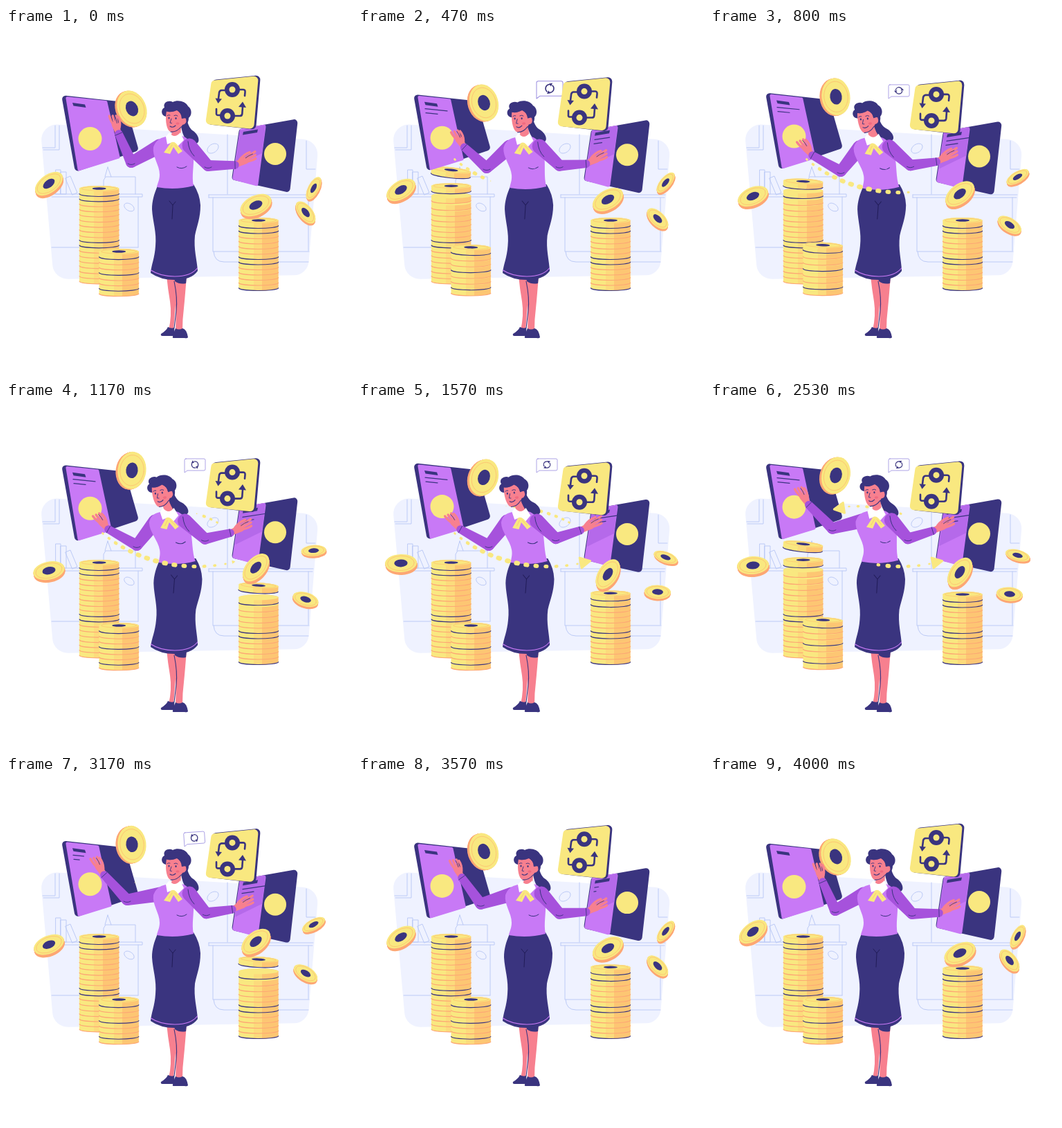
These frames come from a looping animation (500 by 500 pixels, 4.03 s). An HTML page with a canvas:

```html
<!DOCTYPE html>
<html lang="en">
<head>
<meta charset="utf-8">
<title>Coin exchange</title>
<style>
html, body { margin: 0; width: 100%; height: 100%; overflow: hidden; background: #fff; }
canvas { display: block; width: 500px; height: 500px; }
</style>
</head>
<body>
<canvas id="stage" width="500" height="500"></canvas>
<script>
const ctx = document.getElementById('stage').getContext('2d');
const NAVY = '#3a347f', LILAC = '#c879f6', PURPLE = '#a652dc', SKIN = '#f7808f',
  YELLOW = '#f9e880', AMBER = '#fdc673', ORANGE = '#fda774', PALE = '#eff2ff', LINE = '#bccaf6';
const TAU = Math.PI * 2, RAD = Math.PI / 180;

const clamp = v => Math.max(0, Math.min(1, v));
const ramp = (t, a, b) => clamp((t - a) / (b - a));
const mix = (a, b, u) => a + (b - a) * u;
const glide = (t, a, b) => { const u = ramp(t, a, b); return u * u * (3 - 2 * u); };
// rises during a..b, falls during c..d
const span = (t, a, b, c, d) => glide(t, a, b) - glide(t, c, d);
const pulse = (t, at, width) => Math.exp(-(((t - at) / width) ** 2));

function fill(d, color) { ctx.fillStyle = color; ctx.fill(new Path2D(d)); }
function stroke(d, color, w = 1) {
  ctx.strokeStyle = color;
  ctx.lineWidth = w;
  ctx.lineCap = ctx.lineJoin = 'round';
  ctx.stroke(new Path2D(d));
}
function oval(x, y, rx, ry, color, a = 0) {
  ctx.fillStyle = color;
  ctx.beginPath();
  ctx.ellipse(x, y, rx, ry, a, 0, TAU);
  ctx.fill();
}
function ring(x, y, rx, ry, color, w = 1, a = 0, from = 0, to = TAU) {
  ctx.strokeStyle = color;
  ctx.lineWidth = w;
  ctx.beginPath();
  ctx.ellipse(x, y, rx, ry, a, from, to);
  ctx.stroke();
}
function group(draw, x = 0, y = 0, a = 0, k = 1) {
  ctx.save();
  ctx.translate(x, y);
  ctx.rotate(a);
  ctx.scale(k, k);
  draw();
  ctx.restore();
}
// polygon with rounded corners
function slab(pts, r, color) {
  const n = pts.length, [a, b] = [pts[n - 1], pts[0]];
  ctx.beginPath();
  ctx.moveTo((a[0] + b[0]) / 2, (a[1] + b[1]) / 2);
  pts.forEach((p, i) => ctx.arcTo(...p, ...pts[(i + 1) % n], r));
  ctx.closePath();
  ctx.fillStyle = color;
  ctx.fill();
}
// tapered limb between two round joints
function limb(p, q, r1, r2, color) {
  const a = Math.atan2(q[1] - p[1], q[0] - p[0]);
  ctx.fillStyle = color;
  ctx.beginPath();
  ctx.arc(...p, r1, a + Math.PI / 2, a - Math.PI / 2);
  ctx.arc(...q, r2, a - Math.PI / 2, a + Math.PI / 2);
  ctx.fill();
}

function room() {
  slab([[49, 138], [452, 162], [436, 357], [69, 363]], 22, PALE);
  stroke('M71 141V173H53M77 141V176H54M66 240H197V244H66M191 244V317M66 317H191M108 244V317', LINE);
  stroke('M72 205h7v35h-7zM79 208h8v32h-8zM86 217l7 -3 10 24 -7 3z', LINE);
  stroke('M141 240V220l3 -5h43v25M147 201l-4 14M147 201l5 14', LINE);
  ring(178, 259, 8, 5, LINE, 1, .55);
  ring(299, 174, 9, 6, LINE, 1, -.6);
  stroke('M293 241H444M293 245H443M293 241v4M299 245V323M437 245V322M300 323H438M300 323Q301 338 315 338H437', LINE);
  stroke('M320 154V240M434 163V204H447', LINE);
}

function stackCoin(x, y, h, dark, top, tilt) {
  const r = 28.7;
  group(() => {
    ctx.fillStyle = shade(r);
    ctx.beginPath();
    ctx.moveTo(-r, 0);
    ctx.ellipse(0, h, r, 4, 0, Math.PI, 0, true);
    ctx.lineTo(r, 0);
    ctx.ellipse(0, 0, r, 4, 0, 0, Math.PI, true);
    ctx.fill();
    ring(0, h, r, 4, dark ? NAVY : ORANGE, 1.1, 0, .05, Math.PI - .05);
    oval(0, 0, r, 4, YELLOW);
    if (top) {
      ring(0, 0, r - 3, 3, AMBER, .8);
      oval(0, 0, 10, 1.7, NAVY);
    }
  }, x, y, tilt);
}
// three flat bands across a coin's side
function shade(r) {
  const g = ctx.createLinearGradient(-r, 0, r, 0);
  [YELLOW, '#fcdb7c', AMBER].forEach((color, i) => {
    g.addColorStop(i && .15 + i * .22, color);
    g.addColorStop(i < 2 ? .37 + i * .22 : 1, color);
  });
  return g;
}
// every `cycle` coins the first `run` have a dark rim; lift is how high each is thrown
function stack(x, top, n, h, cycle, run, lift) {
  for (let i = n - 1; i >= 0; i--) {
    const up = lift(i);
    stackCoin(x, top + i * h - up, h, i % cycle < run, !i || up > 8, i ? 0 : up * .004);
  }
}
function stacks(t) {
  const p = t % 2000 / 2000;
  const bump = from => Math.sin(Math.PI * ramp(p, from, from + .4));
  stack(134.7, 232, 18, 7.44, 9, 2, i => 27 * bump(.05) * .42 ** i);
  stack(163.2, 323, 8, 7.6, 3, 1, i => 10 * bump(.15) * (1 - i / 8));
  stack(365, 278, 13, 7.5, 6, 2, i => 13 * bump(.4) * .25 ** i);
}

function coin(x, y, rx, ry, deg, ex, ey) {
  const a = deg * RAD;
  for (let i = 5; i > 0; i--) oval(x + ex * i / 5, y + ey * i / 5, rx, ry, ORANGE, a);
  oval(x, y, rx, ry, YELLOW, a);
  ring(x, y, rx * .84, ry * .82, AMBER, 1, a);
  oval(x, y, rx * .42, ry * .42, NAVY, a);
}

// two lines of writing that grow to the share w
function note(x, y, slope, w) {
  if (w < .02) return;
  for (const [i, len] of [32, 17].entries())
    stroke(`M${x + i * Math.sign(slope)} ${y + i * 6}l${len * w} ${len * slope * w}`, NAVY, 1.2);
}
function leftCard(t, c) {
  const f = 12 * (1 - span(t, 0, 400, 3350, 4000));
  group(() => {
    slab([[80, 97], [172, 107], [192, 177], [100, 208]], 5, NAVY);
    slab([[86, 99], [134 + f, 104 + f * .1], [153 + f, 192 - f * .33], [104, 207]], 2, LILAC);
    fill('M96 108l18 2.5 1.5 4.5 -18 -2.5z', NAVY);
    note(97, 118, .1, span(t, 60, 380, 2900, 3420));
    oval(121.5, 160, 17, 17, YELLOW);
  }, 0, 5 * (c - 1));
}
function rightCard(t, c) {
  group(() => {
    slab([[337, 146], [422, 131], [410, 238], [326, 219]], 5, NAVY);
    slab([[338, 146], [376, 139], [364, 229], [327, 219]], 3, LILAC);
    fill('M338 148L375 140 370 181 331 200z', '#b569ea');
    fill('M343 150l21 -3.5 -1 4.5 -21 3.5z', NAVY);
    note(342, 160, -.15, span(t, 250, 600, 3200, 3700));
    oval(389, 182, 16, 16, YELLOW);
  }, 0, 5 - 5 * c);
}

function swapCard(c) {
  group(() => {
    slab([[299, 75], [368, 68], [361, 147], [290, 139]], 6, NAVY);
    slab([[297, 76], [365, 69], [358, 146], [288, 139]], 6, YELLOW);
    stroke('M316 90H311Q308 91 308 94L307 102M336 89H343Q346 89 345.5 93L345 98', NAVY, 2.6);
    stroke('M331 127H338Q341 127 341.3 124L342 114M310 126H306Q303.5 126 304 122V117', NAVY, 2.6);
    fill('M302.5 101.5L312 102.5 306.5 109z', NAVY);
    fill('M336 114L347 115 342 106.5z', NAVY);
    for (const [x, y] of [[327, 89], [320, 127]]) {
      oval(x, y, 11, 11, NAVY);
      oval(x, y, 4.5, 4.5, YELLOW);
    }
  }, 0, 10 - 10 * c);
}

function bubble(t) {
  const k = span(t, 250, 430, 3170, 3450) + .27 * (pulse(t, 480, 150) + pulse(t, 2030, 170));
  if (k < .05) return;
  group(() => {
    const d = 'M2 -20H28Q30 -20 30 -18V-5Q30 -3 28 -3H4L0 0V-18Q0 -20 2 -20z';
    fill(d, '#fff');
    stroke(d, '#9a8de0', .8);
    group(() => {
      for (const a of [0, Math.PI]) {
        ring(0, 0, 4.7, 4.7, NAVY, 1.3, 0, a + .35, a + 2.7);
        group(() => fill('M2.7 .5L7 .5 4.7 -2.8z', NAVY), 0, 0, a);
      }
    }, 15, -11.5, t / 2000 * TAU + .5);
  }, 258, 102, -.08 * ramp(t, 2950, 3200), k);
}

function bezier(pts, u) {
  const weights = [(1 - u) ** 3, 3 * u * (1 - u) ** 2, 3 * u * u * (1 - u), u ** 3];
  return [0, 1].map(j => pts.reduce((sum, p, i) => sum + p[j] * weights[i], 0));
}
// dashes appear from the start of the curve and vanish in the same order
function trail(pts, n, head, tail, fat) {
  for (let i = 0; i < n; i++) {
    const u = i / (n - 1);
    const k = clamp((head * 1.1 - u) * 9) * clamp((u - tail * 1.1) * 9 + 1);
    if (k < .05) continue;
    const [x, y] = bezier(pts, u), [x2, y2] = bezier(pts, u + .01);
    const r = k * (1.5 + fat * Math.sin(Math.PI * u));
    group(() => {
      ctx.beginPath();
      ctx.roundRect(-r * 1.3, -r, r * 2.6, r * 2, r);
      ctx.fillStyle = YELLOW;
      ctx.fill();
    }, x, y, Math.atan2(y2 - y, x2 - x));
  }
}
function arrowHead(x, y, a, k) {
  if (k > .02) group(() => slab([[-9, -10], [10, 0], [-9, 10]], 1.5, YELLOW), x, y, a, k);
}
function upperTrail(t) {
  trail([[305, 174], [280, 160], [240, 149], [201, 151]], 10, ramp(t, 900, 1700), ramp(t, 2250, 3100), .9);
  arrowHead(186, 154, Math.PI - .15, span(t, 1600, 1950, 2750, 3250));
}
function lowerTrail(t) {
  trail([[140, 190], [180, 224], [245, 247], [317, 234]], 15, ramp(t, 240, 900), ramp(t, 1800, 2990), 1.9);
  arrowHead(329, 231, -.2, span(t, 1000, 1500, 2750, 3100));
}

function hand(w, tip, side) {
  const dx = tip[0] - w[0], dy = tip[1] - w[1], len = Math.hypot(dx, dy);
  group(() => {
    limb([-2, 0], [len * .45, 0], 4, 5.3, SKIN);
    for (let i = 0; i < 3; i++) {
      const o = 3.1 * (i - 1);
      stroke(`M${len * .42} ${o * .7}Q${len * .7} ${o * 1.5} ${len - 2 - i * 1.6} ${o * 1.5 + side}`, SKIN, 3.4);
    }
    stroke(`M${len * .25} ${4 * side}Q${len * .5} ${9 * side} ${len * .74} ${8 * side}`, SKIN, 3.4);
    stroke(`M${len * .5} ${3 * side}Q${len * .65} ${4.5 * side} ${len * .82} ${4 * side}`, NAVY, .8);
  }, ...w, Math.atan2(dy, dx));
}
function arm(shoulder, [elbow, wrist, tip], side) {
  hand(wrist, tip, side);
  limb(shoulder, elbow, 10.5, 8, PURPLE);
  limb(elbow, wrist, 8, 5.8, PURPLE);
  const a = Math.atan2(wrist[1] - elbow[1], wrist[0] - elbow[0]);
  const nx = -Math.sin(a) * 5.5, ny = Math.cos(a) * 5.5;
  stroke(`M${wrist[0] + nx} ${wrist[1] + ny}l${-2 * nx} ${-2 * ny}`, NAVY, .9);
  stroke(`M${elbow[0] - 5} ${elbow[1] + 2}q5 3 10 0`, NAVY, .9);
}

// arm poses: elbow, wrist, fingertip
const LEFT = {
  rest: [[181, 194], [163, 153], [152, 124]],
  reach: [[189, 207], [148, 184], [127, 161]],
  raise: [[175, 179], [142, 143], [124, 116]]
};
const RIGHT = {
  rest: [[292, 199], [331, 198], [364, 183]],
  lift: [[285, 197], [320, 184], [354, 168]]
};
const blend = (a, b, u) => a.map((p, i) => p.map((v, j) => mix(v, b[i][j], u)));

function leftArm(t) {
  const out = blend(LEFT.rest, LEFT.reach, glide(t, 0, 800));
  const up = blend(out, LEFT.raise, glide(t, 2050, 2680));
  return blend(up, LEFT.rest, glide(t, 3250, 4000));
}

function legs() {
  fill('M232 358H261Q259 385 257 405Q255 420 255 437L245 437Q246 415 245 400L242 437 235 437Q240 415 237 395Q234 378 232 358z', SKIN);
  fill('M243 360H261L260 369Q251 371 244 366z', NAVY);
  stroke('M243 366Q248 390 246 408L243 434', NAVY, 1.1);
  fill('M224 442Q232 437 234 432Q239 435 243 433L244 445H226Q223 445 224 442z', NAVY);
  fill('M241 446Q243 438 245 434Q250 437 255 434Q261 435 263 447Q262 449 258 448H243Q240 448 241 446z', NAVY);
}

function head(x, y, a) {
  group(() => {
    fill('M254 126C265 130 260 142 271 149C280 156 282 169 271 167C260 166 255 155 253 142z', NAVY);
    fill('M231 128C223 126 224 117 229 115C226 107 236 104 241 107C248 103 260 106 263 113C269 117 269 126 264 130C264 138 258 146 250 142z', NAVY);
    fill('M232 120C230 130 231 144 236 149C242 153 251 147 255 140Q262 139 260 131Q257 128 254 131Q254 123 247 119Q238 123 232 120z', SKIN);
    fill('M229 119Q237 124 246 118Q254 122 254 131L260 130 258 113Q242 106 229 115z', NAVY);
    oval(235.5, 130, 1.1, 1.5, NAVY);
    oval(245.5, 130.5, 1.1, 1.5, NAVY);
    stroke('M233 126.5q2 -1.5 4 -.5M243 126.5q3 -1.5 5 .5M239 131l-2 6 2.5 .5', NAVY, .9);
    stroke('M237 142Q241 145 245 141M238 150Q246 151 253 143', NAVY, 1.1);
    oval(248, 138, 2.6, 1.8, '#f06a80');
  }, x, y, a);
}

function woman(t, slow) {
  const s = span(t, 0, 1000, 2000, 2950);
  const k = 11 / 70 * s, off = -8 * s - k * 160;
  const shear = (x, y) => [x + k * y + off, y + s * 2];
  legs();

  ctx.save();
  ctx.transform(1, 0, -s / 40, 1, s * 355 / 40, 0);
  fill('M219 228C214 240 211 250 211 262C212 280 218 295 216 315C215 332 210 342 209 354Q223 364 244 364Q268 364 277 351C276 335 271 320 273 300C276 285 281 275 281 256Q280 240 271 226z', NAVY);
  stroke('M209.5 350Q223 359 244 359Q267 359 276.5 347', LILAC, 1.2);
  stroke('M236 250l5 6 4 -5M241 256l-1 20', '#211c57', 1);
  ctx.restore();

  // the head turns about the collar
  const a = -.16 * s, n = shear(244, 158), hx = n[0] - 7 * s, hy = n[1] - 1.5 * s;
  const ca = Math.cos(a), sa = Math.sin(a);
  limb([hx + 3, hy - 14], [n[0] + 1, n[1] + 2], 6, 7, SKIN);
  head(hx - (244 * ca - 158 * sa), hy - (244 * sa + 158 * ca), a);

  arm(shear(222, 171), leftArm(t), 1);
  ctx.save();
  ctx.transform(1, 0, k, 1, off, s * 2);
  fill('M231 157C221 159 216 164 213 172C211 186 222 198 222 212C222 220 219 224 218 230Q245 235 271 228C268 214 272 198 271 183C269 166 263 158 254 156z', LILAC);
  fill('M236 151Q243 161 252 151L257 162 247 172 241 165 233 168 231 157z', '#fff');
  fill('M238 166Q242 163 246 167L255 178 249 182 242 172 237 182 228 180z', YELLOW);
  stroke('M240 169l-5 8M244 169l6 7', AMBER, .9);
  stroke('M247 201q7 4 14 -1', NAVY, 1);
  ctx.restore();

  arm(shear(265, 170), blend(RIGHT.rest, RIGHT.lift, (1 - slow) / 2), -1);
  const q = shear(263, 164);
  stroke(`M${q[0]} ${q[1]}q1 13 9 21`, NAVY, 1);
}

function draw(t) {
  const slow = Math.cos(t / 4000 * TAU), fast = Math.cos(t / 2000 * TAU);
  ctx.clearRect(0, 0, 500, 500);
  room();
  stacks(t);
  leftCard(t, slow);
  rightCard(t, slow);
  upperTrail(t);
  coin(182, 107 + 9.5 * fast, 20.5, 27, -24 * slow, -3, 1);
  bubble(t);
  swapCard(slow);
  woman(t, slow);
  lowerTrail(t);
  coin(62, 235 - 10 * fast, 23, 13, -17 - 19 * slow, 1, 4);
  coin(361, 247 + 9 * fast, 24, 14, -43 + 18 * slow, 1, 4);
  coin(444.5, 222.5 + 9 * fast, 18, 8, -16 - 46 * slow, 1, 3);
  coin(433, 276.5 - 10 * fast, 19, 10, 24 + 27 * slow, -.5, 3);
}

const start = performance.now();
function tick() {
  const ms = (performance.now() - start) % 4030;
  const step = Math.min(120, Math.floor((ms + 3.4) * .03));
  draw(step / .03 % 4000);
  requestAnimationFrame(tick);
}
tick();
</script>
</body>
</html>
```
